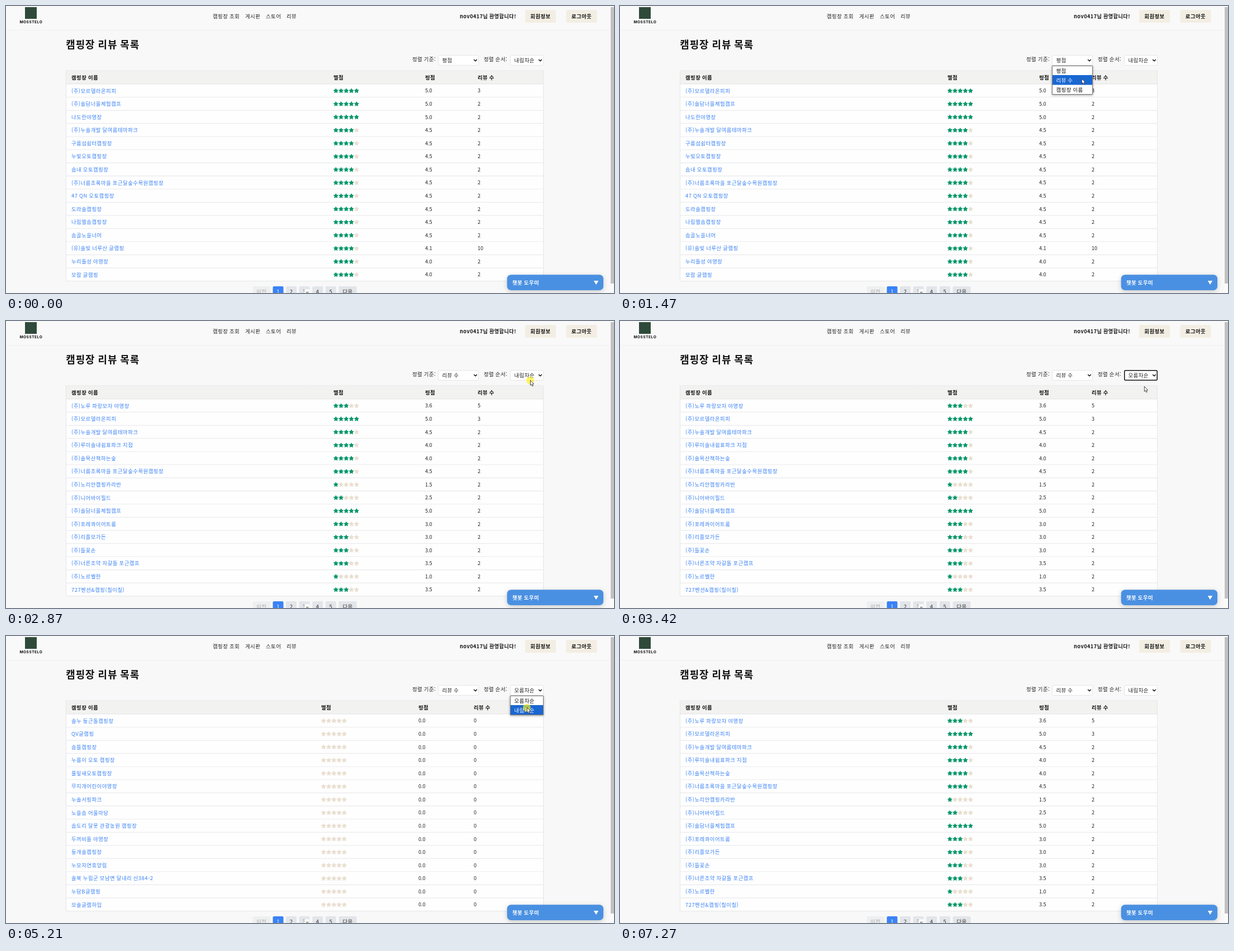
Write an HTML page with a canvas that moves like this. It is 1088 by 515 pixels and loops after 7.34 s.

```html
<!DOCTYPE html>
<html lang="ko">
<head>
<meta charset="utf-8">
<title>캠핑장 리뷰 목록</title>
<style>
html, body { margin: 0; width: 100%; height: 100%; overflow: hidden; background: #f8f8f8; }
canvas { display: block; width: 1088px; height: 515px; }
</style>
</head>
<body>
<canvas id="stage" width="1088" height="515"></canvas>
<script>
const ctx = document.getElementById('stage').getContext('2d');
const LOOP = 7340, STEP = 200 / 3;
const FONT = '"Noto Sans CJK KR", "Noto Sans CJK", sans-serif';
const TRACKING = 0.053;
const ROW = 23.57, TABLE_TOP = 116.5, LEFT = 107.5, RIGHT = 961.5;

const parseRows = s => s.trim().split('\n').map(line => line.split('|'));

const byRating = { cols: [586, 750, 844], rows: parseRows(`
(주)모르델라온피피|5.0|3
(주)솔담너울체험캠프|5.0|2
나도란야영장|5.0|2
(주)누솔개발 달여름테마파크|4.5|2
구름섬쉼터캠핑장|4.5|2
누빛오토캠핑장|4.5|2
솜내 오토캠핑장|4.5|2
(주)너름초록마을 포근달숲수목원캠핑장|4.5|2
47 QN 오토캠핑장|4.5|2
도라솔캠핑장|4.5|2
나림별솜캠핑장|4.5|2
솜골노을너머|4.5|2
(유)솔빛 너루산 글램핑|4.1|10
누리돌성 야영장|4.0|2
모람 글램핑|4.0|2`) };

const mostReviews = { cols: byRating.cols, rows: parseRows(`
(주)노루 파랑모자 야영장|3.6|5
(주)모르델라온피피|5.0|3
(주)누솔개발 달여름테마파크|4.5|2
(주)루미솔내쉼표파크 지점|4.0|2
(주)솔목산책하는숲|4.0|2
(주)너름초록마을 포근달숲수목원캠핑장|4.5|2
(주)노리안캠핑카라반|1.5|2
(주)니어바이필드|2.5|2
(주)솔담너울체험캠프|5.0|2
(주)포레콰이어트룸|3.0|2
(주)리플모가든|3.0|2
(주)들꽃손|3.0|2
(주)너른조약 자갈돌 포근캠프|3.5|2
(주)노르벨란|1.0|2
727펜션&캠핑(칠이칠)|3.5|2`) };

const fewestReviews = { cols: [564, 738, 837], rows: [
  '솔누 둥근돌캠핑장', 'QV글램핑', '솜뜰캠핑장', '누름이 오토 캠핑장', '풀잎새오토캠핑장',
  '무지개어린이야영장', '누솔서핑파크', '노을솜 어울마당', '솜도리 달못 관광농원 캠핑장', '두꺼비돌 야영장',
  '둥개솔캠핑장', '누모자연휴양림', '솔북 누림군 모남면 달내리 산384-2', '누담B글램핑', '모솔글램하임'
].map(name => [name, '0.0', '0']) };

const sortKey = { x: 773, w: 73, options: ['평점', '리뷰 수', '캠핑장 이름'] };
const sortOrder = { x: 902, w: 60, options: ['오름차순', '내림차순'] };

// Pointer stops: time, x, y
const path = [
  [130, 1067, 507], [800, 831, 92], [930, 819, 95], [1070, 819, 95], [1470, 826, 130],
  [1740, 826, 130], [1870, 826, 127], [2330, 936, 103], [2530, 936, 103], [2670, 938, 106],
  [2940, 938, 106], [3150, 938, 117], [3820, 938, 117], [4010, 938, 107], [4140, 938, 107],
  [4550, 935, 95], [4620, 935, 95], [5010, 932, 128], [5280, 932, 128], [5880, 910, 128],
  [6470, 910, 128], [7000, 1070, 515]
];
const presses = [[930, 1070], [1740, 1800], [2870, 2940], [3350, 3420], [4010, 4080], [5210, 5280]];
const popups = [[1000, 1800, sortKey], [2940, 3420, sortOrder], [4080, 5280, sortOrder]];
const rings = [[1800, 2870, sortKey], [3420, 4010, sortOrder], [5280, 7270, sortOrder]];

const active = (spans, t) => spans.find(([from, to]) => t >= from && t < to);

function pointerAt(t) {
  const i = path.findIndex(p => p[0] > t);
  if (i < 1) return path[i ? path.length - 1 : 0].slice(1);
  const [t0, x0, y0] = path[i - 1], [t1, x1, y1] = path[i];
  const u = (t - t0) / (t1 - t0), e = u * u * (3 - 2 * u);
  return [x0 + (x1 - x0) * e, y0 + (y1 - y0) * e];
}

function text(s, x, y, { size = 9.4, bold = false, color = '#222', align = 'left', tracking = TRACKING } = {}) {
  ctx.font = `${bold ? 'bold ' : ''}${size}px ${FONT}`;
  ctx.letterSpacing = `${size * tracking}px`;
  ctx.textAlign = align;
  ctx.fillStyle = color;
  ctx.fillText(s, x, y + size * 0.375);
}

function box(x, y, w, h, fill, radius = 0, stroke, lineWidth = 1) {
  ctx.beginPath();
  ctx.roundRect(x, y, w, h, radius);
  if (fill) { ctx.fillStyle = fill; ctx.fill(); }
  if (stroke) { ctx.strokeStyle = stroke; ctx.lineWidth = lineWidth; ctx.stroke(); }
}

function polygon(points, fill, stroke, lineWidth) {
  ctx.beginPath();
  points.forEach(([x, y]) => ctx.lineTo(x, y));
  ctx.closePath();
  ctx.fillStyle = fill;
  ctx.fill();
  if (stroke) { ctx.strokeStyle = stroke; ctx.lineWidth = lineWidth; ctx.stroke(); }
}

function withShadow(color, blur, dy, draw) {
  ctx.save();
  ctx.shadowColor = color;
  ctx.shadowBlur = blur;
  ctx.shadowOffsetY = dy;
  draw();
  ctx.restore();
}

function star(cx, cy, fill) {
  ctx.lineJoin = 'round';
  polygon(Array.from({ length: 10 }, (_, i) => {
    const a = i * Math.PI / 5 - Math.PI / 2, r = i % 2 ? 2 : 4.1;
    return [cx + r * Math.cos(a), cy + r * Math.sin(a)];
  }), fill, fill, 1);
}

function drawHeader() {
  box(0, 0, 1081, 43, '#f9f9f9');
  box(0, 43, 1081, 1, '#efefef');
  box(34, 2, 21, 21, '#2f4a3a');
  ctx.letterSpacing = '0.5px';
  ctx.font = 'bold 6.6px Inter, sans-serif';
  ctx.textAlign = 'center';
  ctx.fillStyle = '#111';
  ctx.fillText('MOSSTELO', 44.8, 30.8);

  [['캠핑장 조회', 370], ['게시판', 428], ['스토어', 465], ['리뷰', 502]]
    .forEach(([label, x]) => text(label, x, 18.5));
  text('nov0417님 환영합니다!', 812, 18.5, { size: 9.1, bold: true, color: '#111' });
  [['회원정보', 929], ['로그아웃', 1002.5]].forEach(([label, x]) => {
    box(x, 7, 55, 23, '#f3eee3', 2);
    text(label, x + 27.5, 18.5, { bold: true, color: '#111', align: 'center' });
  });
}

function drawSelect({ x, w, options }, index, ringed) {
  box(x + .5, 88.5, w - 1, 18, '#fff', 2.5, '#e6e6e6');
  if (ringed) box(x + .75, 88.75, w - 1.5, 17.5, null, 2, '#111', 1.5);
  text(options[index], x + 7.5, 97.7);
  const cx = x + w - 6;
  ctx.beginPath();
  ctx.moveTo(cx - 2.8, 96);
  ctx.lineTo(cx, 98.8);
  ctx.lineTo(cx + 2.8, 96);
  ctx.strokeStyle = '#111';
  ctx.lineWidth = 1.5;
  ctx.stroke();
}

function drawTable({ cols, rows }) {
  const bottom = TABLE_TOP + ROW * 16;
  box(LEFT, TABLE_TOP, RIGHT - LEFT, bottom - TABLE_TOP, '#fefefe');
  box(LEFT, TABLE_TOP, RIGHT - LEFT, ROW, '#f2f2f1');
  const [starX, ratingX, countX] = cols;
  [['캠핑장 이름', 117], ['별점', starX], ['평점', ratingX], ['리뷰 수', countX]]
    .forEach(([label, x]) => text(label, x, 128.5, { bold: true, color: '#111' }));
  rows.forEach(([name, rating, count], i) => {
    const y = 152 + ROW * i;
    box(LEFT, y - 12.4, RIGHT - LEFT, .9, '#e5e6e8');
    text(name, 117, y, { color: '#3b82f6' });
    for (let k = 0; k < 5; k++) {
      star(starX + 4.3 + 9.25 * k, y + .3, k < Math.floor(rating) ? '#059669' : '#e9dfd0');
    }
    text(rating, ratingX, y, { size: 9.1, tracking: 0 });
    text(count, countX, y, { size: 9.1, tracking: 0 });
  });
  box(LEFT, TABLE_TOP - .5, RIGHT - LEFT, 377.5, null, 0, '#e5e6e8');
}

function drawPager() {
  const button = (label, x, w, fill, color) => {
    box(x, 503, w, 19, fill, 2);
    text(label, x + w / 2, 512.3, { color, align: 'center' });
  };
  button('이전', 441.5, 31.5, '#eeeff0', '#aaa');
  button('1', 477.5, 19, '#3b82f6', '#fff');
  ['2', '3', '4', '5'].forEach((n, i) => button(n, 501 + 23.6 * i, 19, '#e2e5e9', '#333'));
  button('다음', 595.5, 32, '#e2e5e9', '#333');
  box(534, 508, 9.5, 8, '#fafafa', 2);
  box(537, 513, 4.5, 1.2, '#666');
}

function drawChat() {
  withShadow('rgba(0,0,0,.2)', 8, 2, () => box(896.7, 482.3, 172.3, 27.7, '#4a90e2', 7));
  text('챗봇 도우미', 906, 496.3, { bold: true, color: '#fff' });
  polygon([[1051.8, 493], [1060.2, 493], [1056, 500]], '#fff');
}

function drawPopup([from, , { x, w, options }], t, selected, py) {
  const h = options.length * 17;
  const opening = t < from + 65;
  let fill = '#fff';
  if (opening) {
    fill = ctx.createLinearGradient(0, 107, 0, 107 + h);
    fill.addColorStop(0, '#f3f3f3');
    fill.addColorStop(1, '#fff');
  }
  withShadow('rgba(0,0,0,.4)', 4, 1, () => box(x, 107, w, h + .5, fill));
  if (opening) return;
  const hovered = py >= 107.5 ? Math.min(options.length - 1, Math.floor((py - 107) / 17)) : selected;
  box(x, 107 + hovered * 17, w, 17.5, '#1967d2');
  options.forEach((label, i) =>
    text(label, x + 7.5, 116 + 17 * i, { color: i === hovered ? '#fff' : '#111' }));
  box(x + .5, 107.5, w - 1, h, null, 0, '#777');
}

function drawPointer(x, y, pressed) {
  if (pressed) {
    ctx.beginPath();
    ctx.arc(x, y + .8, 7, 0, Math.PI * 2);
    ctx.fillStyle = 'rgba(255,242,30,.66)';
    ctx.fill();
  }
  ctx.save();
  ctx.translate(x, y);
  polygon([[.4, .4], [.4, 9.4], [2.4, 7.7], [3.9, 11], [5.4, 10.3], [4, 7.2], [6.6, 7]], '#fff', '#222', .8);
  ctx.restore();
}

function draw(t) {
  const keyIndex = t < 1800 ? 0 : 1;
  const orderIndex = t >= 3420 && t < 5280 ? 0 : 1;
  const table = t < 1860 ? byRating : t >= 3485 && t < 5345 ? fewestReviews : mostReviews;
  const ring = active(rings, t);
  const popup = active(popups, t);
  const held = Math.floor((t + 5) / STEP) * STEP;
  const [px, py] = pointerAt(held);

  box(0, 0, 1088, 515, '#f8f8f8');
  drawHeader();
  text('캠핑장 리뷰 목록', 107.3, 69, { size: 17.9, bold: true, color: '#111' });
  text('정렬 기준:', 727, 95);
  text('정렬 순서:', 855, 95);
  drawSelect(sortKey, keyIndex, ring?.[2] === sortKey);
  drawSelect(sortOrder, orderIndex, ring?.[2] === sortOrder);
  drawTable(table);
  drawPager();
  drawChat();
  box(1081, 0, 7, 515, '#fafafa');
  box(1082, 2, 6, 496, '#c1c1c1');
  if (popup) drawPopup(popup, t, popup[2] === sortKey ? keyIndex : orderIndex, py);
  if (t >= 130 && t < 7000) drawPointer(px, py, active(presses, t));
}

const start = performance.now();
function tick() {
  draw((performance.now() - start) % LOOP);
  requestAnimationFrame(tick);
}
tick();
</script>
</body>
</html>
```
